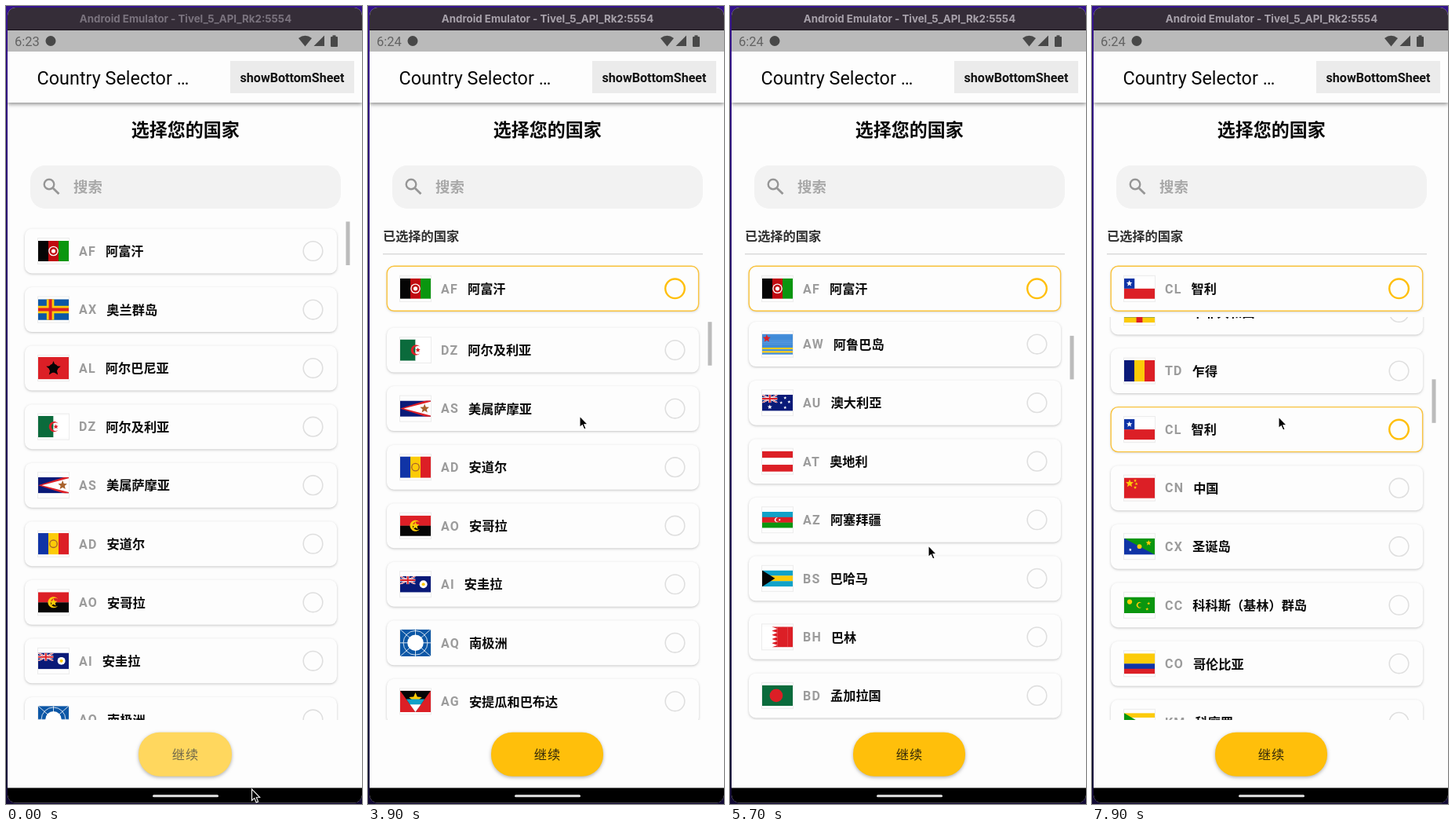
An HTML page with a canvas for the animation above (8000 ms loop, 454 by 1016 pixels).

```html
<!DOCTYPE html>
<html lang="zh-CN">
<head>
<meta charset="utf-8">
<title>Country Selector</title>
<style>
html, body { margin: 0; width: 100%; height: 100%; overflow: hidden; background: #1c0b52; }
canvas { display: block; width: 454px; height: 1016px; }
</style>
</head>
<body>
<canvas id="stage"></canvas>
<script>
const W = 454, H = 1016, LOOP = 8000, STEP = 100, PITCH = 74.55;
const CJK = '"Noto Sans CJK SC", "Noto Sans CJK", sans-serif';
const ROBOTO = 'Roboto, sans-serif';
const AMBER = '#ffbf0b', PAPER = '#fdfdfd';
const canvas = document.getElementById('stage');
const ctx = canvas.getContext('2d');
const dpr = window.devicePixelRatio || 1;
canvas.width = W * dpr;
canvas.height = H * dpr;

const INK = {
  r: '#dc1f26', e: '#c00a10', w: '#ffffff', b: '#1034a6', n: '#0a1a78', u: '#0c57a6', f: '#3f8ad8',
  g: '#0b6b3c', l: '#0a960f', y: '#fccb08', k: '#050505', c: '#74acdf', o: '#f2a010', t: '#a8622c', a: '#10a2c8'
};

// code|name|flag layers|height ratio
// h,v stripes  o disc  s star  m crescent  p polygon  x cross  t hoist triangle
// q canton  j union canton  z serration  d diagonals  n polar grid
const ROWS = `AF|阿富汗|v kel;o w .5 .5 .24;o e .5 .5 .19;o w .5 .5 .1
AX|奥兰群岛|h u;x y .4 .36;x r .4 .15|.68
AL|阿尔巴尼亚|h r;s k .5 .52 .34;o k|.73
DZ|阿尔及利亚|v gw;m r .52 .5 .24;s r .58 .5 .12|.7
AS|美属萨摩亚|h n;p r 1 -.1 0 .5 1 1.1;p w 1 .06 .12 .5 1 .94;s t .8 .5 .3|.52
AD|安道尔|v byr;o t .5 .5 .2;o y .5 .5 .15|.7
AO|安哥拉|h rk;m y .5 .5 .27;s y
AI|安圭拉|h n;j;o w .76 .5 .24;o y .76 .5 .1|.53
AQ|南极洲|h u;n;o w .5 .5 .3|.88
AG|安提瓜和巴布达|h r;p k 0 0 1 0 .5 1;s y .5 .4 .32;p a .2 .4 .8 .4 .67 .66 .33 .66;p w .32 .64 .68 .64 .5 1|.7
AR|阿根廷|h cwc;o o .5 .5 .14|.64
AM|亚美尼亚|h rbo|.54
AW|阿鲁巴岛|h ffffffffyfyf;s r .15 .22|.67
AU|澳大利亞|h n;j;s w .25 .76 .15;s w .75 .2 .1;s w .62 .5 .1;s w .88 .45 .1;s w .75 .8 .1|.53
AT|奥地利|h rwr|.67
AZ|阿塞拜疆|h arl;m w .48 .5 .14;s w .57 .5 .08|.53
BS|巴哈马|h aya;t k .42|.53
BH|巴林|v wwrrrr;z w
BD|孟加拉国|h g;o r .46 .5 .32
BB|巴巴多斯|v byb;s k
BY|白俄罗斯|h rrg|.5
BE|比利时|v kyr
BZ|伯利兹|h rbbbbbbr;o w .5 .5 .3
BJ|贝宁|h yr;q g .4 1
BM|百慕大|h r;j;o w .75|.5
BT|不丹|h o;p y 0 0 1 0 0 1;s w
BO|玻利维亚|h ryg
BA|波斯尼亚和黑塞哥维那|h b;p y .3 0 .8 0 .8 1|.5
BW|博茨瓦纳|h cccwkkwccc
BR|巴西|h l;p y .5 .08 .93 .5 .5 .92 .07 .5;o b .5 .5 .25|.72
IO|英属印度洋领地|h wbwbwbwbw;j|.53
BN|文莱达鲁萨兰国|h y;p w 0 0 1 .55 1 .78 0 .25;p k 0 .25 1 .75 1 1 0 .5;s r|.53
BG|保加利亚|h wlr|.6
BF|布基纳法索|h rl;s y
BI|布隆迪|h r;p l 0 0 1 1 1 0 0 1;d w;o w .5 .5 .27;s r .5 .5 .14
KH|柬埔寨|h brrb;s w
CM|喀麦隆|v gry;s y
CA|加拿大|v rwwr;s r .5 .5 .26|.52
CV|佛得角|h bbbbwrwb;o y .4 .65 .14
KY|开曼群岛|h n;j;o w .76|.52
CF|中非共和国|h bwgy;p r .4 0 .6 0 .6 1 .4 1
TD|乍得|v nyr|.7
CL|智利|h wr;q b .34 .5;s w .17 .25 .15
CN|中国|h r;s y .18 .28 .2;s y .36 .14 .08;s y .4 .3 .08;s y .36 .48 .08
CX|圣诞岛|h b;p l 0 0 1 0 1 1;o y .5 .5 .14;s y .8 .28 .18;s w .2 .7 .1|.53
CC|科科斯（基林）群岛|h l;o y .18 .3 .15;m y .5 .5 .18;s y .8 .4 .1;s y .75 .75 .1|.53
CO|哥伦比亚|h yybr|.67
KM|科摩罗|h ywrb;t l .5|.6`.split('\n').map(line => {
  const [code, name, layers, ratio] = line.split('|');
  return { code, name, ratio: +(ratio || .67), layers: layers.split(';').map(l => l.split(' ')) };
});

const SCROLL = [[3500, 0], [3900, 219.6], [4300, 520], [4900, 663.5], [5400, 676], [5700, 898],
  [6000, 1650], [6300, 2128], [6600, 2290], [6900, 2750], [7250, 3026]];
const POINTER = [[0, 313, 997], [500, 313, 990], [1500, 290, 312], [2500, 290, 312], [3300, 268, 738],
  [3500, 269, 741], [3900, 269.5, 522], [4100, 268, 470], [4600, 262, 640], [4900, 265.5, 587],
  [5300, 251, 740], [5700, 252.5, 687], [5950, 262, 540], [6300, 273.5, 624], [6600, 272, 650],
  [6900, 262, 500], [7300, 237.5, 523]];

const clamp01 = v => Math.max(0, Math.min(1, v));

// Monotone cubic through the keys
function track(keys, t, col) {
  const last = keys.length - 1;
  if (t <= keys[0][0]) return keys[0][col];
  if (t >= keys[last][0]) return keys[last][col];
  const slope = i => (keys[i + 1][col] - keys[i][col]) / (keys[i + 1][0] - keys[i][0]);
  const tangent = i => {
    if (i === 0 || i === last) return 0;
    const a = slope(i - 1), b = slope(i);
    return a * b > 0 ? 2 * a * b / (a + b) : 0;
  };
  const i = keys.findIndex(k => k[0] > t) - 1;
  const span = keys[i + 1][0] - keys[i][0], u = (t - keys[i][0]) / span, v = 1 - u;
  return keys[i][col] * (1 + 2 * u) * v * v + keys[i + 1][col] * u * u * (3 - 2 * u)
    + span * u * v * (tangent(i) * v - tangent(i + 1) * u);
}

function rect(x, y, w, h, color) {
  ctx.fillStyle = color;
  ctx.fillRect(x, y, w, h);
}

function round(x, y, w, h, r) {
  ctx.beginPath();
  ctx.roundRect(x, y, w, h, r);
}

function disc(x, y, r, color) {
  ctx.fillStyle = color;
  ctx.beginPath();
  ctx.arc(x, y, r, 0, Math.PI * 2);
  ctx.fill();
}

function poly(pts, color) {
  ctx.fillStyle = color;
  ctx.beginPath();
  for (let i = 0; i < pts.length; i += 2) ctx.lineTo(pts[i], pts[i + 1]);
  ctx.closePath();
  ctx.fill();
}

function lines(segments, width, color) {
  ctx.strokeStyle = color;
  ctx.lineWidth = width;
  ctx.beginPath();
  for (const [x1, y1, x2, y2] of segments) {
    ctx.moveTo(x1, y1);
    ctx.lineTo(x2, y2);
  }
  ctx.stroke();
}

function text(str, x, y, font, color, align = 'left', spacing = 0) {
  ctx.font = font;
  ctx.fillStyle = color;
  ctx.textAlign = align;
  ctx.letterSpacing = spacing + 'px';
  ctx.fillText(str, x, y);
  const width = ctx.measureText(str).width;
  ctx.letterSpacing = '0px';
  return width;
}

function shadow(color, blur, dy) {
  ctx.shadowColor = color;
  ctx.shadowBlur = blur * dpr;
  ctx.shadowOffsetY = dy * dpr;
}
const noShadow = () => shadow('transparent', 0, 0);

function star(x, y, r, color) {
  const pts = [];
  for (let i = 0; i < 10; i++) {
    const a = i * Math.PI / 5 - Math.PI / 2, d = i % 2 ? r * .45 : r;
    pts.push(x + d * Math.cos(a), y + d * Math.sin(a));
  }
  poly(pts, color);
}

function crescent(x, y, r, color) {
  ctx.fillStyle = color;
  ctx.beginPath();
  ctx.arc(x, y, r, .62, -.62);
  ctx.arc(x + r * .28, y, r * .79, -.827, .827, true);
  ctx.fill();
}

function jack(w, h) {
  const diag = [[0, 0, w, h], [0, h, w, 0]], cross = [[w / 2, 0, w / 2, h], [0, h / 2, w, h / 2]];
  ctx.save();
  ctx.beginPath();
  ctx.rect(0, 0, w, h);
  ctx.clip();
  rect(0, 0, w, h, INK.n);
  lines(diag, h * .2, INK.w);
  lines(diag, h * .07, INK.r);
  lines(cross, h * .34, INK.w);
  lines(cross, h * .2, INK.r);
  ctx.restore();
}

function drawLayer([kind, key, ...args], w, h) {
  const n = args.map(Number), color = INK[key], [x = .5, y = .5, r = .2] = n;
  const spot = [x * w, y * h, r * h, color];
  switch (kind) {
    case 'h': [...key].forEach((c, i) => rect(0, i * h / key.length, w, h / key.length + .2, INK[c])); break;
    case 'v': [...key].forEach((c, i) => rect(i * w / key.length, 0, w / key.length + .2, h, INK[c])); break;
    case 'o': disc(...spot); break;
    case 's': star(...spot); break;
    case 'm': crescent(...spot); break;
    case 'p': poly(n.map((v, i) => v * (i % 2 ? h : w)), color); break;
    case 'x': lines([[x * w, 0, x * w, h], [0, h / 2, w, h / 2]], y * h, color); break;
    case 't': poly([0, 0, x * w, h / 2, 0, h], color); break;
    case 'q': rect(0, 0, x * w, y * h, color); break;
    case 'j': jack(w / 2, h / 2); break;
    case 'd': lines([[0, 0, w, h], [0, h, w, 0]], h * .2, color); break;
    case 'z':
      for (let i = 0; i < 5; i++) poly([w / 3 - 1, i * h / 5, w / 2, (i + .5) * h / 5, w / 3 - 1, (i + 1) * h / 5], color);
      break;
    case 'n':
      lines([[0, h / 2, w, h / 2], [w / 2, 0, w / 2, h], [0, 0, w, h], [0, h, w, 0]], .8, INK.w);
      ctx.beginPath();
      ctx.arc(w / 2, h / 2, h * .45, 0, Math.PI * 2);
      ctx.stroke();
  }
}

function drawFlag(row, cy) {
  const w = 39, h = w * row.ratio;
  ctx.strokeStyle = '#ececec';
  ctx.lineWidth = 1;
  ctx.strokeRect(40.5, cy - 16.5, 40, 33);
  ctx.save();
  ctx.translate(41, cy - h / 2);
  ctx.beginPath();
  ctx.rect(0, 0, w, h);
  ctx.clip();
  row.layers.forEach(layer => drawLayer(layer, w, h));
  ctx.restore();
}

function drawCard(row, cy, picked) {
  shadow('rgba(0,0,0,.22)', 3, 1);
  round(24, cy - 28.5, 398, 57, 9);
  ctx.fillStyle = PAPER;
  ctx.fill();
  noShadow();
  if (picked) {
    round(24.2, cy - 28.5, 397.4, 57, 9);
    ctx.strokeStyle = '#fac33c';
    ctx.lineWidth = 1.4;
    ctx.stroke();
  }
  drawFlag(row, cy);
  const codeW = text(row.code, 93, cy + 5.8, '700 16px ' + ROBOTO, '#9c9c9c', 'left', 1.2);
  text(row.name, 93 + codeW + 12, cy + 6.2, '700 16.2px ' + CJK, '#0a0a0a');
  ctx.beginPath();
  ctx.arc(391.5, cy, 12.3, 0, Math.PI * 2);
  ctx.strokeStyle = picked ? AMBER : '#dfdfdf';
  ctx.lineWidth = picked ? 2.4 : 1.6;
  ctx.stroke();
}

function drawList(t, picked) {
  const top = picked < 0 ? 274 : 396, scroll = track(SCROLL, t, 1);
  // Rows reached by the fast fling mount late and fade in
  const veil = 1 - clamp01((t - 6150) / 450);
  ctx.save();
  ctx.beginPath();
  ctx.rect(2, top, 450, 909 - top);
  ctx.clip();
  ROWS.forEach((row, i) => {
    const cy = top + 38 + i * PITCH - scroll;
    if (cy < top - 32 || cy > 942) return;
    drawCard(row, cy, i === picked);
    if (i < 19) return;
    ctx.globalAlpha = veil;
    rect(2, cy - PITCH / 2, 450, PITCH, PAPER);
    ctx.globalAlpha = 1;
  });
  ctx.restore();
  rect(433.5, top + .5 + scroll / 38.4, 5, 55.5, '#bcbcbc');
}

function drawStatus(t) {
  rect(2, 31, 452, 27, '#bababa');
  text(t < 3000 ? '6:23' : '6:24', 11, 51, '400 16.5px ' + ROBOTO, '#626262');
  disc(57, 44.5, 6.5, '#484848');
  ctx.fillStyle = '#484848';
  ctx.beginPath();
  ctx.moveTo(381.5, 51.5);
  ctx.lineTo(373, 41);
  ctx.quadraticCurveTo(381.5, 34.5, 390, 41);
  ctx.fill();
  poly([392.5, 51, 406, 37.5, 406, 51], '#484848');
  round(414, 39, 9, 13, 1);
  ctx.fill();
  rect(416.5, 37.3, 4, 2, '#484848');
}

function drawHeader(t) {
  rect(2, 2, 452, 29, '#352d38');
  rect(2, 30, 452, 1, '#17121a');
  const titleColor = t < 600 ? '#7a737e' : '#a8a2ab';
  text('Android Emulator - Tivel_5_API_Rk2:5554', 229, 21, '700 13.3px Inter, sans-serif', titleColor, 'center');
  shadow('rgba(0,0,0,.45)', 5, 2);
  rect(2, 58, 452, 65, PAPER);
  noShadow();
  text('Country Selector …', 39.5, 99.5, '400 23.4px ' + ROBOTO, '#080808');
  rect(286, 70, 158, 41, '#ebebeb');
  text('showBottomSheet', 365, 96.5, '700 16.1px ' + ROBOTO, '#111', 'center');
}

function drawSearch() {
  text('选择您的国家', 228.7, 165.5, '700 23px ' + CJK, '#080808', 'center');
  round(31, 203, 396, 55, 19);
  ctx.fillStyle = '#f2f2f2';
  ctx.fill();
  ctx.beginPath();
  ctx.arc(55, 227, 6.3, 0, Math.PI * 2);
  ctx.strokeStyle = '#969696';
  ctx.lineWidth = 2.4;
  ctx.stroke();
  lines([[59.5, 231.5, 67.5, 239.2]], 2.8, '#969696');
  text('搜索', 86, 236.8, '700 18.4px ' + CJK, '#a8a8a8');
}

function drawFooter(active) {
  const [x, w] = active ? [157, 143] : [169, 119];
  shadow('rgba(0,0,0,.3)', 4, 1.5);
  round(x, 924.7, w, 56, 27);
  ctx.fillStyle = active ? AMBER : '#ffd75e';
  ctx.fill();
  noShadow();
  text('继续', 229, 959.3, '400 16.2px ' + CJK, active ? '#33290a' : '#71694a', 'center', 1);
  rect(2, 995.5, 452, 20, '#000');
  round(187, 1004.3, 84, 3, 1.5);
  ctx.fillStyle = '#e4e4e4';
  ctx.fill();
}

function drawPointer(t) {
  ctx.save();
  ctx.translate(track(POINTER, t, 1), track(POINTER, t, 2));
  const shape = [.5, 0, .5, 14.5, 3.8, 11.6, 6.2, 17, 8.6, 16, 6.3, 10.7, 10.7, 10.5];
  poly(shape, '#000');
  ctx.strokeStyle = '#fff';
  ctx.lineWidth = 1.1;
  ctx.stroke();
  ctx.restore();
}

function drawDesktop() {
  const sky = ctx.createLinearGradient(0, 0, 0, H);
  sky.addColorStop(0, '#34128c');
  sky.addColorStop(.5, '#1f0b5a');
  sky.addColorStop(1, '#120a34');
  rect(0, 0, W, H, sky);
}

function draw(t) {
  const picked = t < 2500 ? -1 : t < 7600 ? 0 : ROWS.findIndex(r => r.code === 'CL');
  ctx.setTransform(dpr, 0, 0, dpr, 0, 0);
  drawDesktop();
  ctx.save();
  round(2, 2, 452, 1012.5, 10);
  ctx.clip();
  rect(2, 2, 452, 1013, PAPER);
  drawHeader(t);
  drawStatus(t);
  drawSearch();
  drawList(t, picked);
  if (picked >= 0) {
    text('已选择的国家', 19, 299, '700 16.2px ' + CJK, '#303030');
    rect(19, 315, 408, 1.5, '#dadada');
    drawCard(ROWS[picked], 359.8, true);
  }
  drawFooter(picked >= 0);
  ctx.restore();
  drawPointer(t);
}

const start = performance.now();
function tick() {
  const t = (performance.now() - start) % LOOP;
  draw(Math.floor(t / STEP) * STEP);
  requestAnimationFrame(tick);
}
tick();
</script>
</body>
</html>
```
